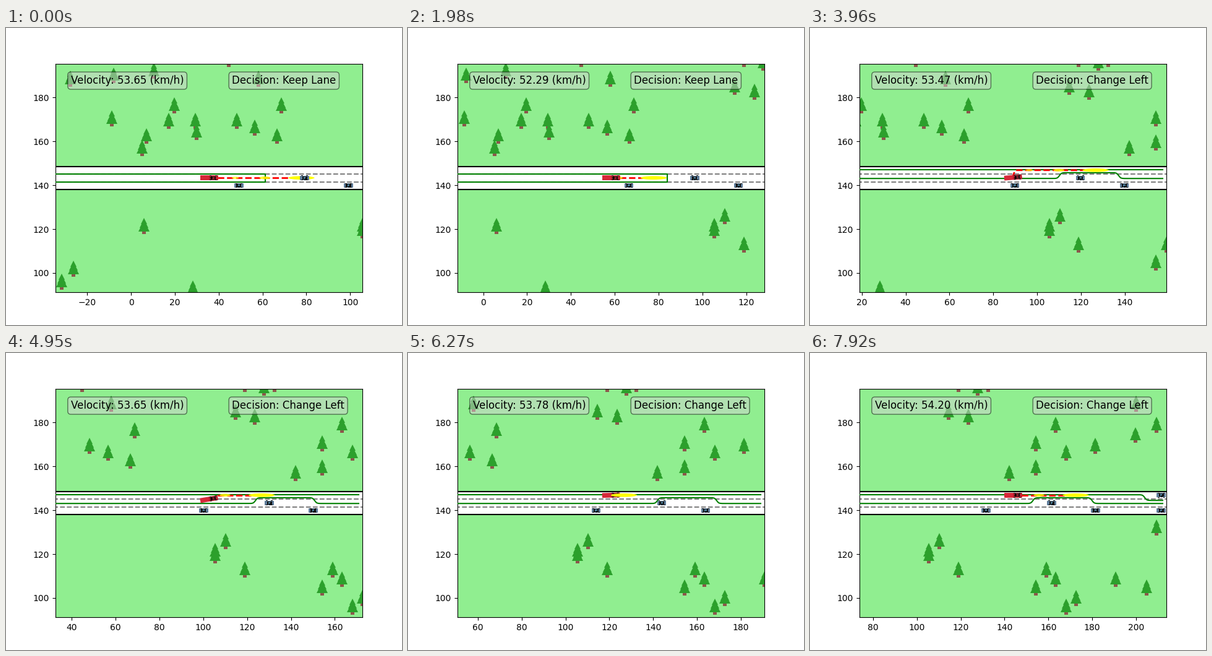
Animation, 640 px wide and 480 px high, one loop 8000 ms. Source, as a matplotlib script:

```python
import numpy as np
import matplotlib.pyplot as plt
from matplotlib.animation import FuncAnimation
from matplotlib.patches import Ellipse, Rectangle
from matplotlib.transforms import Affine2D

LOOP, TICK, STEP = 8000, 40, 330
LAST = LOOP // STEP
VIEW = 140                       # metres across the view
UNIT = 496 / VIEW                # pixels per metre
ROAD, LANE = 138, 3.5            # lower kerb and lane width
PLANS = (35.55, 84.42, 130.2)    # where each ten-step plan begins
PACE = 4.54                      # ego metres per step

# Landscape: height of a row -> where its trees stand
FOREST = {197.5: (44.6, 119, 132.4), 195.9: (127.8,), 192.2: (10.4,),
          190.2: (-7.9,), 188.6: (-27.6, 58.1, 199.9), 184.9: (114.6,),
          182.6: (123.6,), 179: (163.4, 209.3), 176.4: (19.7, 68.6),
          174.4: (199.8,), 170.5: (-8.7, 154.3), 169.5: (17.2, 29.4, 48.2, 181.5),
          166.3: (56.5, 168.2), 164.3: (29.9,), 162.5: (7, 66.6),
          159.5: (154.3,), 157: (5.1, 142), 132.1: (209.3,), 125.9: (110.3,),
          121.5: (5.9, 105.5), 119.4: (105.5,), 112.9: (119, 159.1),
          108.6: (163.4, 190.8), 104.9: (154.3, 204.8), 102: (-26.2,),
          99.9: (172.6,), 96.1: (-31.6, 168.2), 93.1: (28.3,)}

fig = plt.figure(figsize=(6.4, 4.8), dpi=100)
ax = fig.add_subplot()
ax.set_facecolor("lightgreen")
ax.set_ylim(91.17, 91.17 + 369.6 / UNIT)


def lane_y(lane):
    return ROAD + LANE * (lane + 0.54)


def ego_x(step):
    """Steady pace within a plan; each plan's opening view is held one step."""
    return PLANS[step // 10] + PACE * max(step % 10 - 1, 0)


def ego_y(step):
    u = np.clip((step - 10.8) / 8.6, 0, 1)
    return lane_y(1) + LANE * u * u * (3 - 2 * u)


def ramp(x, at):
    return 0.5 + 0.5 * np.tanh((x - at) / 0.95)


def stamp(xs, ys, shape, size, color, z):
    """Markers of a given pixel size."""
    line, = ax.plot(xs, ys, shape, ms=size * 0.72, mew=0, color=color, zorder=z)
    return line


def plant_trees():
    xs, ys = np.array([(x, y) for y, row in FOREST.items() for x in row]).T
    stamp(xs, ys - 10 / UNIT, "s", 6, "tab:brown", 1)
    for size, up in ((17.5, 0), (14, 3.5), (10, 7.8)):
        stamp(xs, ys + up / UNIT, "^", size, "tab:green", 1.1)


def make_car(body, roof, z, shift=0):
    """Rectangles seen from above: body, wheels, windows, roof."""
    parts = [(0, 0, 4.1, 1.9, body)]
    parts += [(sx * 1.2, sy * 0.95, 0.8, 0.3, "#101010")
              for sx in (-1, 1) for sy in (-1, 1)]
    parts += [(sx * 0.85, 0, 0.6, 1.5, "#101010") for sx in (-1, 1)]
    parts += [(0, 0, 1.1, 1.4, "#202428"), (0, 0, 0.9, 0.8, roof)]
    return [ax.add_patch(Rectangle((x + shift - w / 2, y - h / 2), w, h,
                                   color=c, lw=0, zorder=z))
            for x, y, w, h, c in parts]


def place(parts, x, y, angle=0.0):
    move = Affine2D().rotate(angle).translate(x, y) + ax.transData
    for part in parts:
        part.set_transform(move)


plant_trees()
ax.axhspan(ROAD, ROAD + 3 * LANE, color="white", lw=0, zorder=2)
for i in range(4):
    kerb = i in (0, 3)
    ax.plot([-200, 500], [ROAD + i * LANE] * 2, "-" if kerb else "--",
            color="black" if kerb else "gray", lw=1.5, zorder=2.1)

upper, = ax.plot([], [], color="green", lw=1.5, zorder=3)
lower, = ax.plot([], [], color="green", lw=1.5, zorder=3)
route, = ax.plot([], [], "--", color="red", lw=2, zorder=3.5)

# Uncertainty grows with the distance ahead of the plan's start.
AHEAD = (12, 25.5, 42.2)
blobs = [ax.add_patch(Ellipse((0, 0), 3 + 8.8 * (d / 42) ** 3, 0.7 + 0.9 * d / 42,
                              color="yellow", lw=0, alpha=0.6 + 0.4 * d / 42.2,
                              zorder=5 if d > 40 else 3.6))
         for d in AHEAD]

ego = [ax.add_patch(Rectangle((-4, -1.1), 8.1, 2.2, color="#d62839", lw=0,
                              zorder=4))]
ego += make_car("#bd2030", "#a01826", 4.1, 2)
ego_star = stamp([], [], "*", 6, "black", 4.2)

TRAFFIC = [(0, 0), (50, 0), (80, 0), (30, 1), (80, 2)]   # gap, lane
cars = [make_car("#5f7d9b", "#4f8aa8", 6) for _ in TRAFFIC]
stars = stamp([], [], "*", 5, "black", 6.2)

box = dict(boxstyle="round", facecolor="lightgray", alpha=0.5)
label = dict(transform=ax.transAxes, fontsize=12, va="top", bbox=box, zorder=8)
speed = ax.text(0.05, 0.95, "", **label)
choice = ax.text(0.575, 0.95, "", **label)


def draw_corridor(plan, x):
    left = x - VIEW / 2 - 2
    if plan == 0:
        end = x + 25.7
        low, high = ROAD + LANE, ROAD + 2 * LANE
        upper.set_data([left, end, end, left], [high, high, low, low])
        lower.set_data([], [])
        return
    xs = np.linspace(left, x + 68.3, 500)
    mid = x + (34.7 if plan == 1 else 22.6)
    drop = 2.6 * ramp(xs, x + 60.1) * (plan == 2)
    bump = ramp(xs, mid - 13.5) - ramp(xs, mid + 13.5)
    upper.set_data(xs, 147.1 - drop)
    lower.set_data(xs, 143.1 + 2.65 * bump)


def draw_route(plan, x, y, changing):
    start = PLANS[plan]
    goal_y = lane_y(2 if plan else 1)
    for blob, ahead in zip(blobs, AHEAD):
        blob.set_center((start + ahead, goal_y))
        blob.set_visible(start + ahead > x)
    end = max(start + AHEAD[-1], x + 4)
    if changing:
        route.set_data([x - 0.4, x + 0.8, x + 1.4, end],
                       [y - 0.3, goal_y - 0.6, goal_y, goal_y])
    else:
        route.set_data([x + 4, end], [goal_y, goal_y])


def update(frame):
    step = min((frame * TICK + TICK - 1) // STEP, LAST)
    plan = step // 10
    x, y = ego_x(step), ego_y(step)
    ax.set_xlim(x - VIEW / 2, x + VIEW / 2)
    draw_corridor(plan, x)
    draw_route(plan, x, y, plan == 1 and y < lane_y(1.45))

    slope = (ego_y(step + 0.5) - ego_y(step - 0.5)) / PACE
    place(ego, x, y, 1.25 * np.arctan(slope))
    ego_star.set_data([x + 1.2], [y])

    rear = 49.2 + 0.76 * (x - PLANS[0])
    spots = [(rear + gap, lane_y(lane)) for gap, lane in TRAFFIC]
    for car, spot in zip(cars, spots):
        place(car, *spot)
    stars.set_data([s[0] for s in spots], [s[1] - 0.4 for s in spots])

    v = np.interp(step, [1, 4, 9, 12, 15, 19, 24],
                  [53.65, 51.31, 53.76, 53.47, 53.65, 53.78, 54.20])
    speed.set_text(f"Velocity: {v:.2f} (km/h)")
    choice.set_text("Decision: " + ("Change Left" if plan else "Keep Lane"))
    return []


anim = FuncAnimation(fig, update, frames=LOOP // TICK, interval=TICK,
                     init_func=lambda: update(0), repeat=True, repeat_delay=0)
plt.show()
```
